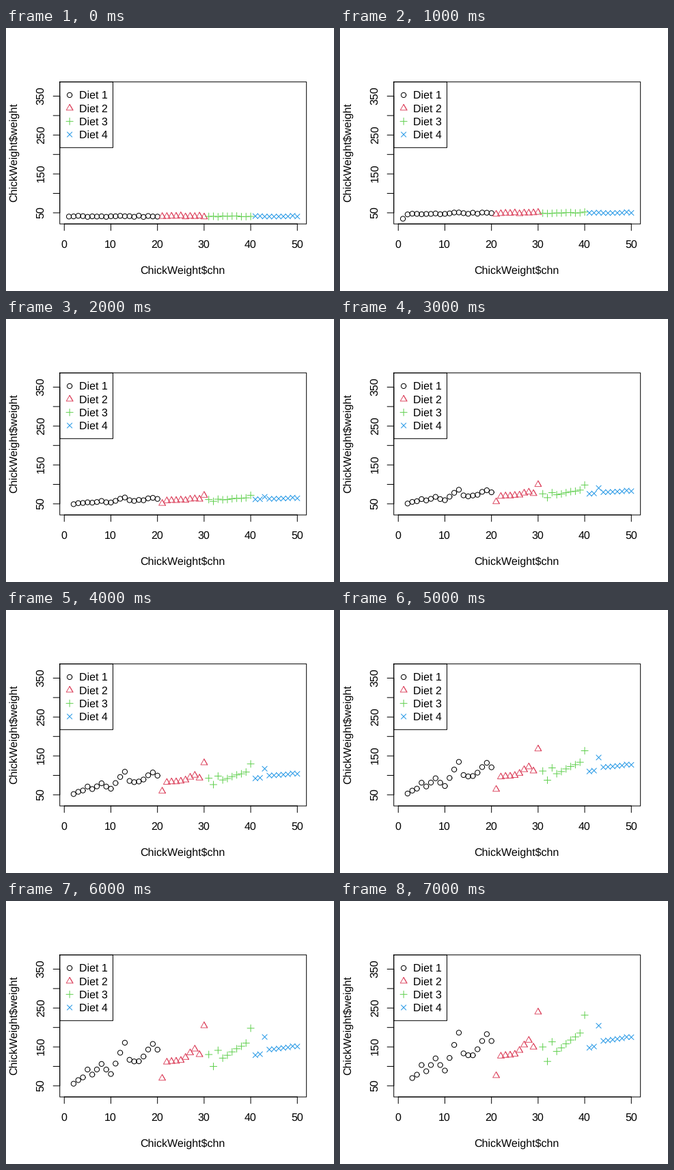
Animation of 480 by 384 pixels, one loop 8 s. Source, as a matplotlib script:

```python
import numpy as np
import matplotlib.pyplot as plt
from matplotlib.animation import FuncAnimation
from matplotlib.collections import LineCollection

W, H, DPI = 480, 384, 96
LINE = 19.2                       # height of one margin line in px
LEFT, RIGHT = 4.1 * LINE, W - 2.1 * LINE
TOP, BOTTOM = 4.1 * LINE, H - 5.1 * LINE
COLORS = ["black", "#DF536B", "#61D04F", "#2297E6"]
LW = 0.75                         # one pixel, in points

plt.rcParams.update({"font.family": "Liberation Sans", "font.size": 12,
                     "text.hinting": "none"})

chick = np.arange(1, 51)
diet = np.repeat([0, 1, 2, 3], [20, 10, 10, 10])
days = range(0, 15, 2)

# Typical day 10 weight at the turning points along the row of chicks;
# the first chick is the one that loses weight
SIZE = {1: -140, 2: 53, 4: 65, 5: 82, 6: 71, 8: 92, 10: 72, 13: 134, 14: 100,
        16: 96, 19: 132, 20: 121, 21: 64, 22: 96, 25: 98, 28: 122, 29: 110,
        30: 169, 31: 111, 32: 87, 33: 120, 34: 103, 39: 134, 40: 163,
        41: 109, 42: 111, 43: 146, 44: 121, 50: 127}
LAST_DAY = {1: 2, 2: 12}          # chicks that die early

size = np.interp(chick, list(SIZE), list(SIZE.values()))
last_day = np.array([LAST_DAY.get(c, 99) for c in chick])
wobble = np.random.default_rng(4).normal(0, 0.8, chick.size)


def weights(day):
    """Shared growth curve, with the chicks easing apart by size."""
    mean = 41 + 3.2 * day + 0.48 * day**2 - 0.0125 * day**3
    u = day / 20
    spread = 2 * u * u * (3 - 2 * u)
    w = mean + spread * (size - 108) + wobble
    return np.where(day <= last_day, w, np.nan)


def px(x):
    return LEFT + (x + 0.96) / 52.92 * (RIGHT - LEFT)


def py(y):
    return BOTTOM - (y - 21.48) / 365.04 * (BOTTOM - TOP)


def symbol_strokes():
    """Strokes of the four plot symbols around (0, 0), in px."""
    r = 3.6
    a = np.linspace(0, 2 * np.pi, 49)
    circle = r * np.column_stack([np.cos(a), np.sin(a)])
    tip, side, foot = -1.555 * r, 1.347 * r, 0.7776 * r
    triangle = np.array([(0, tip), (side, foot), (-side, foot),
                         (0, tip), (side, foot)])
    p = r * np.sqrt(2)
    plus = [np.array([(-p, 0), (p, 0)]), np.array([(0, -p), (0, p)])]
    cross = [np.array([(-r, -r), (r, r)]), np.array([(-r, r), (r, -r)])]
    return [[circle], [triangle], plus, cross]


SYMBOLS = symbol_strokes()

fig = plt.figure(figsize=(W / DPI, H / DPI), dpi=DPI, facecolor="white")
ax = fig.add_axes([0, 0, 1, 1])
ax.set(xlim=(0, W), ylim=(H, 0))
ax.axis("off")


def rule(xs, ys):
    ax.plot(xs, ys, color="black", lw=LW, snap=False,
            solid_capstyle="round", solid_joinstyle="round")


def frame(x0, y0, x1, y1):
    rule([x0, x1, x1, x0, x0], [y0, y0, y1, y1, y0])


def label(x, y, s, ha="center", rotation=0):
    ax.text(x, y, s, ha=ha, va="baseline", rotation=rotation,
            rotation_mode="anchor", parse_math=False)


def strokes(kind, xs, ys):
    return [s + (x, y) for x, y in zip(xs, ys) if np.isfinite(y)
            for s in SYMBOLS[kind]]


def add_symbols(kind, segments):
    lines = LineCollection(segments, colors=COLORS[kind], linewidths=LW,
                           capstyle="round", joinstyle="round", snap=False)
    ax.add_collection(lines, autolim=False)
    return lines


# Plot frame, axes and titles
frame(LEFT, TOP, RIGHT, BOTTOM)
rule([px(0), px(50)], [BOTTOM] * 2)
rule([LEFT] * 2, [py(50), py(350)])
for v in range(0, 51, 10):
    rule([px(v)] * 2, [BOTTOM, BOTTOM + LINE / 2])
    label(px(v) - 0.3, BOTTOM + 1.8 * LINE, str(v))
for v in range(50, 351, 50):
    rule([LEFT - LINE / 2, LEFT], [py(v)] * 2)
    if v % 100:
        label(LEFT - 1.2 * LINE, py(v) - 1, str(v), rotation=90)
label((LEFT + RIGHT) / 2 - 0.6, BOTTOM + 3.85 * LINE, "ChickWeight$chn")
label(LEFT - 3.2 * LINE, (TOP + BOTTOM) / 2 - 1.3, "ChickWeight$weight",
      rotation=90)

# Legend
frame(LEFT, TOP, 156.5, TOP + 5 * LINE)
for k in range(4):
    y = TOP + (k + 1) * LINE
    add_symbols(k, strokes(k, [LEFT + 14.4], [y]))
    label(LEFT + 28, y + 5.3, f"Diet {k + 1}", ha="left")

groups = [add_symbols(k, []) for k in range(4)]


def update(i):
    w = weights(days[i])
    for k, lines in enumerate(groups):
        mine = diet == k
        lines.set_segments(strokes(k, px(chick[mine]), py(w[mine])))
    return groups


anim = FuncAnimation(fig, update, frames=len(days), interval=1000,
                     repeat=True, repeat_delay=0)
plt.show()
```
